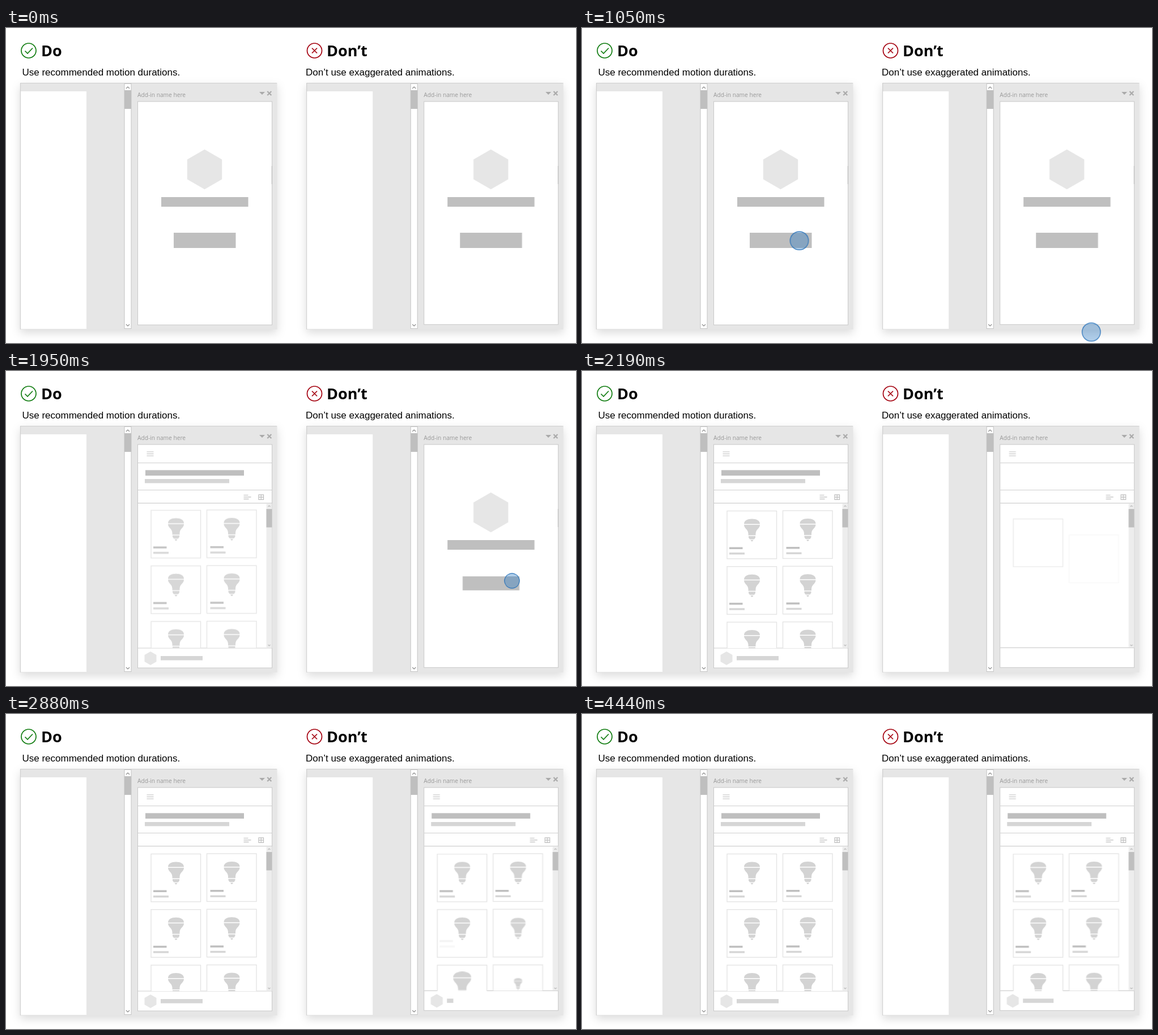
These frames come from a looping animation (1006 px wide and 557 px high, 4470 ms). An HTML page:

```html
<!DOCTYPE html>
<html lang="en">
<head>
<meta charset="utf-8">
<title>Motion durations</title>
<style>
html, body { margin: 0; width: 100%; height: 100%; overflow: hidden; background: #fff; }
svg { display: block; width: 1006px; height: 557px; }
.title { font: 700 27px "Open Sans", sans-serif; }
.sub { font: 17px "Liberation Sans", Arial, sans-serif; }
.name { font: 10.2px "Open Sans", sans-serif; fill: #999; }
.shadow { filter: drop-shadow(0 6px 8px rgba(0, 0, 0, .14)); }
.line { fill: none; stroke: #cfcfcf; stroke-width: 1.2; }
.icon { fill: none; stroke: #bdbdbd; stroke-width: 1.2; }
.caret { fill: none; stroke: #8c8c8c; stroke-width: 1.2; }
.mid { fill: #bfbfbf; }
.soft { fill: #d6d6d6; }
.pale { fill: #e6e6e6; }
.bulb { fill: #d3d3d3; }
.pointer { fill: rgba(30, 115, 195, .35); stroke: #2570b8; stroke-width: 1.2; }
.bulb, .button, .hex { transform-box: fill-box; transform-origin: center; }
.grow { transform-box: fill-box; transform-origin: left; }
</style>
</head>
<body>
<svg id="stage" viewBox="0 0 1006 557">
  <defs>
    <clipPath id="cardArea"><rect x="233" y="234" width="227" height="255.5"/></clipPath>
    <clipPath id="paneArea"><rect x="233" y="130.5" width="236.5" height="394"/></clipPath>
  </defs>
  <g fill="none" stroke="#107c10" stroke-width="1.7">
    <circle cx="40" cy="40" r="13"/><path d="M33.5 40.5 38 45 47 35.5"/>
  </g>
  <g fill="none" stroke="#a4000f" stroke-width="1.7">
    <circle cx="544.5" cy="40" r="13"/><path d="M540 35.5l9 9m0-9l-9 9"/>
  </g>
  <text class="title" x="62" y="50">Do</text>
  <text class="title" x="566" y="50">Don’t</text>
  <text class="sub" x="28.5" y="83.5">Use recommended motion durations.</text>
  <text class="sub" x="529" y="83.5">Don’t use exaggerated animations.</text>
</svg>
<script>
const LOOP = 4470;
const OUT = 'cubic-bezier(.215,.61,.355,1)';
const SOFT_OUT = 'cubic-bezier(.25,.46,.45,.94)';
const stage = document.getElementById('stage');

const rect = (cls, x, y, w, h) => `<rect class="${cls}" x="${x}" y="${y}" width="${w}" height="${h}"/>`;
const path = (cls, d) => `<path class="${cls}" d="${d}"/>`;
const hexagon = (cls, x, y, w, h) =>
  path(cls, `M${x} ${y - h}l${w} ${h / 2}v${h}l${-w} ${h / 2}l${-w} ${-h / 2}v${-h}z`);

// steps: [ms, properties, easing towards the next step]
function play(el, steps) {
  const frames = steps.map(([ms, props, easing = 'linear']) => ({ offset: ms / LOOP, easing, ...props }));
  if (frames[0].offset > 0) frames.unshift({ ...frames[0], offset: 0, easing: 'linear' });
  frames.push({ ...frames[frames.length - 1], offset: 1 });
  el.animate(frames, { duration: LOOP, iterations: Infinity });
}

const tween = (el, start, length, from, to, easing = OUT) =>
  play(el, [[start, from, easing], [start + length, to]]);
const shift = (x, y) => `translate(${x}px, ${y}px)`;
const scale = s => ({ transform: `scale(${s})` });

const BULB = 'M-14 9C-14 3-8 0 0 0S14 3 14 9ZM-14 10.5H14C14 17 7 18 6.5 26V29H-6.5V26C-7 18-14 17-14 10.5Z' +
  'M-6 30.5H6V33L4 36H-4L-6 33ZM-2.5 37.3H2.5L1 39.7H-1Z';

function card(i, textShift) {
  const col = i % 2, row = i >> 1;
  const x = 256 + col * 98.5, y = 247.5 + row * 98.3 - col * .5;
  const tx = 4 + (col ? textShift[row] : 0);
  return `<g transform="translate(${x} ${y})"><g class="card">
    <rect width="87.5" height="84.5" fill="#fff" stroke="#e4e4e4" stroke-width="1.4"/>
    <g transform="translate(44 14)">${path('bulb', BULB)}</g>
    <g class="label">${rect('mid', tx, 64, 23.5, 3.5)}${rect('soft', tx, 73.5, 27, 3.5)}</g>
  </g></g>`;
}

function panel(x, dy, barWidth, textShift) {
  const g = document.createElementNS('http://www.w3.org/2000/svg', 'g');
  g.setAttribute('transform', `translate(${x} 0)`);
  g.innerHTML = `
    <g class="shadow">${rect('pale', 25, 97, 453.5, 436)}</g>
    ${path('line', 'M25.5 533V97.5H478')}
    <rect x="26" y="112" width="116" height="420" fill="#fff"/>
    <rect x="209" y="98.5" width="12" height="433" fill="#fff" stroke="#c4c4c4"/>
    ${rect('mid', 209, 110, 12, 33)}
    ${path('caret', 'M212 107l3-3 3 3M212 524l3 3 3-3')}
    <text class="name" x="232" y="121.5">Add-in name here</text>
    <path d="M447 113h10l-5 5z" fill="#aaa"/>
    <path d="M461.3 112l7 7m0-7l-7 7" stroke="#aaa" stroke-width="2.2"/>
    <rect x="232.5" y="130" width="237" height="${395 + dy}" fill="#fff" stroke="#c8c8c8"/>
    <g class="welcome">
      <path d="M469.3 244v32" stroke="#b4b4b4"/>
      ${hexagon('pale', 350.5, 250, 30.7, 35.2)}
      ${rect('mid', 274, 299, 153.5, 17)}
      ${rect('mid button', 296, 362, 109.5, 27)}
    </g>
    <g class="list" clip-path="url(#paneArea)">
      ${path('line', `M233 162.5H469M233 210.5H469M233 233.7H469M233 ${490 + dy}H469`)}
      ${path('icon', 'M248.5 143H260.5M248.5 146.5H260.5M248.5 150H260.5')}
      ${path('icon', 'M419.5 219.5h8m-8 3.4h13m-13 3.4h9M446 218.8h8.5v8.5h-8.5zm4.2 0v8.5m-4.2-4.2h8.5')}
      <rect x="459.5" y="234.5" width="10" height="${255 + dy}" fill="#ededed"/>
      ${rect('mid', 459.5, 244, 10, 32.5)}
      ${path('icon', 'M462.5 240l2-2 2 2M462.5 484l2 2 2-2')}
      <g class="heading">${rect('mid', 246, 175.3, 174, 9.7)}${rect('soft', 245, 191, 149, 7.3)}</g>
      <g clip-path="url(#cardArea)"><g class="cards">${[0, 1, 2, 3, 4, 5].map(i => card(i, textShift)).join('')}</g></g>
      <g class="footer">${hexagon('pale hex', 255, 508 + dy, 10.5, 12)}</g>
      ${rect('soft grow', 273, 504 + dy, barWidth, 7.5)}
    </g>`;
  stage.append(g);
  return g;
}

// A curved approach that slows down, then a press.
function pointer(g, endX, start, press) {
  const curve = [[-43, 204], [67, 139], [87, 29], [0, 0]];
  const at = (s, axis) => {
    const r = 1 - s, w = [r * r * r, 3 * r * r * s, 3 * r * s * s, s * s * s];
    return curve.reduce((sum, p, i) => sum + p[axis] * w[i], 0);
  };
  const node = document.createElementNS('http://www.w3.org/2000/svg', 'g');
  node.innerHTML = '<circle class="pointer" r="16.2"/>';
  stage.append(node);
  const steps = [];
  for (let i = 0; i <= 30; i++) {
    const s = 1 - (1 - i / 30) ** 3;
    steps.push([start + 760 * i / 30, { transform: shift(endX + at(s, 0), 371 + at(s, 1)) }]);
  }
  play(node, steps);
  play(node.firstChild, [
    [press, { ...scale(1), opacity: 1 }, 'ease-in-out'],
    [press + 90, { ...scale(.81), opacity: 1 }, 'ease-in-out'],
    [press + 140, { ...scale(.95), opacity: 1 }],
    [press + 190, { ...scale(1), opacity: 0 }]
  ]);
  play(g.querySelector('.button'), [
    [press, scale(1), 'ease-in-out'], [press + 90, scale(.915), 'ease-in-out'], [press + 160, scale(1)]
  ]);
}

function swap(g, start, length) {
  tween(g.querySelector('.welcome'), start, length, { opacity: 1 }, { opacity: 0 }, 'linear');
  tween(g.querySelector('.list'), start, length, { opacity: 0 }, { opacity: 1 }, 'linear');
}

const calm = panel(0, 0, 74, [2, 2]);
const busy = panel(505.2, -.7, 54, [0, 2]);
pointer(calm, 371, 573, 1430);
pointer(busy, 893, 1004, 1860);

swap(calm, 1560, 80);
tween(calm.querySelector('.cards'), 1600, 500,
  { transform: shift(0, -15), opacity: 0 }, { transform: shift(0, 0), opacity: 1 }, SOFT_OUT);

swap(busy, 2030, 130);
tween(busy.querySelector('.heading'), 2400, 240,
  { transform: shift(0, -10), opacity: 0 }, { transform: shift(0, 0), opacity: 1 }, SOFT_OUT);
tween(busy.querySelector('.footer'), 2370, 300, { transform: shift(-40, 0) }, { transform: shift(0, 0) }, SOFT_OUT);
tween(busy.querySelector('.hex'), 2370, 300, { transform: 'rotate(-60deg)' }, { transform: 'rotate(0deg)' }, SOFT_OUT);
tween(busy.querySelector('.grow'), 2820, 800, { transform: 'scaleX(0)' }, { transform: 'scaleX(1)' });

// start times per card: [slide, bulb, label]
const cues = [[2080, 2200, 2540], [2160, 2290, 2640], [2230, 2260, 2860],
  [2325, 2450, 3150], [2460, 2640, 3300], [2530, 2770, 3300]];
busy.querySelectorAll('.card').forEach((el, i) => {
  const [slide, bulb, label] = cues[i];
  play(el, [
    [slide, { transform: shift(0, 60), opacity: 0 }, OUT],
    [slide + 300, { transform: shift(0, 0), opacity: 1 }]
  ]);
  play(el.querySelector('.bulb'), [
    [bulb, scale(0)], [bulb + 240, scale(1.13), 'ease-in-out'],
    [bulb + 420, scale(.94), 'ease-in-out'], [bulb + 600, scale(1)]
  ]);
  tween(el.querySelector('.label'), label, 230,
    { transform: shift(0, -12), opacity: 0 }, { transform: shift(0, 0), opacity: 1 }, SOFT_OUT);
});
</script>
</body>
</html>
```
